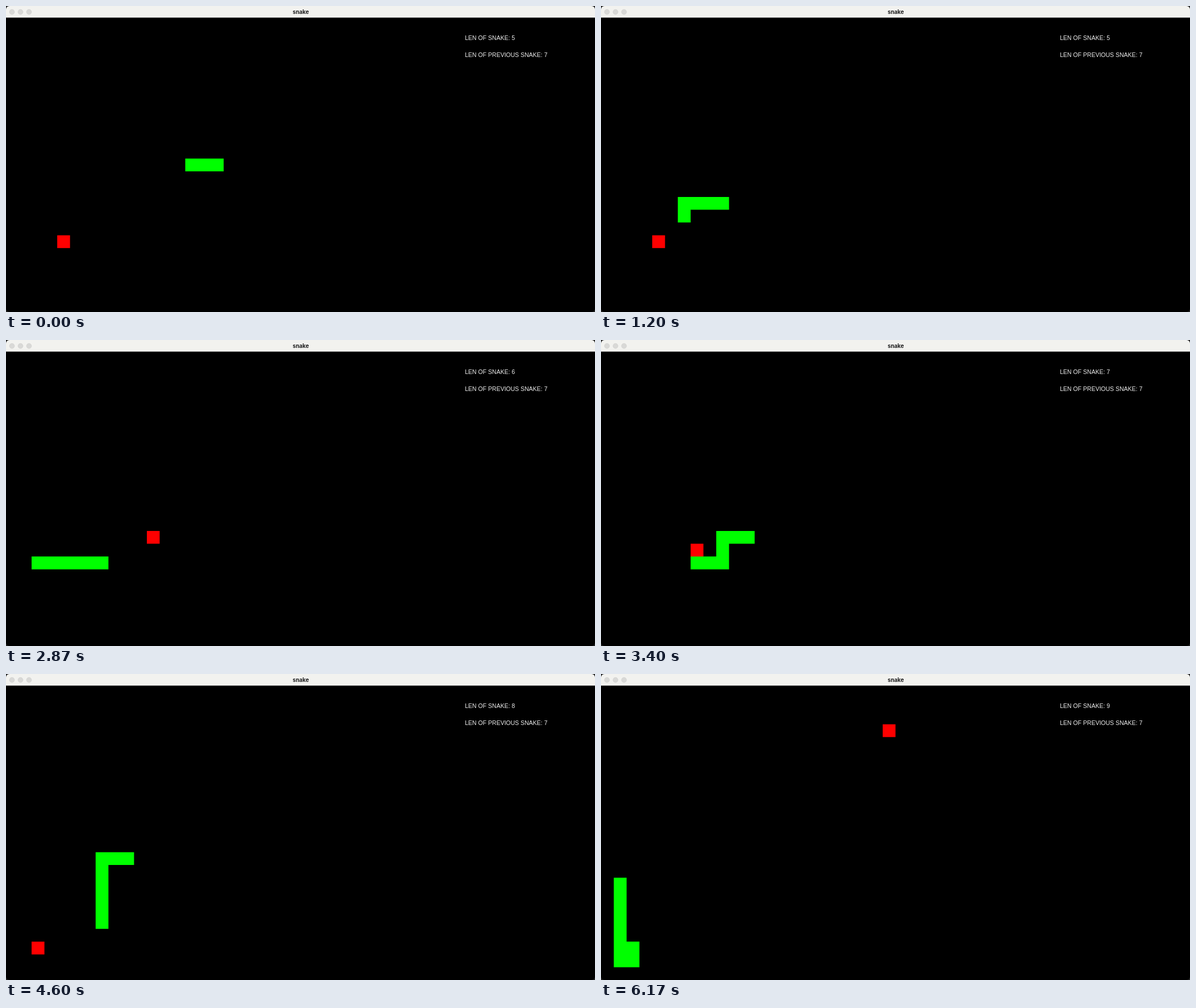
Write an HTML page that moves like this. It is 1037 by 540 pixels and loops after 6210 ms.

```html
<!DOCTYPE html>
<html lang="en">
<head>
<meta charset="utf-8">
<title>snake</title>
<style>
  html, body { margin: 0; width: 100%; height: 100%; overflow: hidden; background: #222; }
  svg { display: block; }
  .title { font: 700 9.8px Inter, sans-serif; fill: #1c1c1c; text-anchor: middle; }
  .score { font: 10.5px "Liberation Sans", Arial, sans-serif; fill: #eee; }
  .lights { fill: #d9d9d7; stroke: #cbcbc9; stroke-width: .6; }
  .board { fill: none; stroke-width: 1; stroke-linecap: square; }
</style>
</head>
<body>
<svg width="1037" height="540" viewBox="0 0 1037 540">
  <rect width="1037" height="540" rx="6"/>
  <path d="M0 20.6V6a6 6 0 0 1 6-6H1031a6 6 0 0 1 6 6V20.6z" fill="#f2f2ef"/>
  <g class="lights">
    <circle cx="10.5" cy="10.5" r="4.4"/>
    <circle cx="25.5" cy="10.5" r="4.4"/>
    <circle cx="40.5" cy="10.5" r="4.4"/>
  </g>
  <text class="title" x="519" y="13.6">snake</text>
  <text class="score" x="808" y="59.6">LEN OF SNAKE: <tspan id="length">5</tspan></text>
  <text class="score" x="808" y="89.6">LEN OF PREVIOUS SNAKE: 7</text>
  <!-- One unit is one cell; cell centres lie on whole numbers. -->
  <g class="board" transform="translate(0 21.06) scale(22.543 22.563) translate(.5 .5)">
    <path id="snake" stroke="#0f0"/>
    <path id="food" stroke="#f00"/>
  </g>
</svg>
<script>
const LOOP = 6210, STEP = 100.5, FIRST_STEP = 66.5, START_LENGTH = 5;
const MOVES = 'L5 D3 L5 D3 L6 U1 R9 U2 R3 U1 L5 D5 L3 D1 L1 D1 L1 D1 L1 U6';
const FOODS = [[4, 17], [11, 14], [7, 15], [2, 20], [22, 3]];
const DIRECTIONS = { L: [-1, 0], R: [1, 0], U: [0, -1], D: [0, 1] };

// The snake uncoils from a single cell.
const trail = Array.from({ length: START_LENGTH }, () => [16, 11]);
const states = [];
let eaten = 0;
for (const run of MOVES.split(' ')) {
  const [dx, dy] = DIRECTIONS[run[0]];
  for (let i = 0; i < +run.slice(1); i++) {
    const [x, y] = trail.at(-1);
    const head = [x + dx, y + dy];
    trail.push(head);
    if (String(head) === String(FOODS[eaten])) eaten++;
    const length = START_LENGTH + eaten;
    states.push({ length, body: trail.slice(-length), food: FOODS[eaten] });
  }
}
states.shift(); // the loop opens after two moves

const byId = id => document.getElementById(id);
const snake = byId('snake'), food = byId('food'), lengthText = byId('length');

let shown = -1;
function draw() {
  const time = performance.now() % LOOP;
  const step = Math.floor((time - FIRST_STEP) / STEP) + 1;
  const index = Math.max(0, Math.min(step, states.length - 1));
  if (index !== shown) {
    const state = states[shown = index];
    snake.setAttribute('d', `M${state.body.join('L')}`);
    food.setAttribute('d', `M${state.food}h0`);
    lengthText.textContent = state.length;
  }
  requestAnimationFrame(draw);
}
draw();
</script>
</body>
</html>
```
